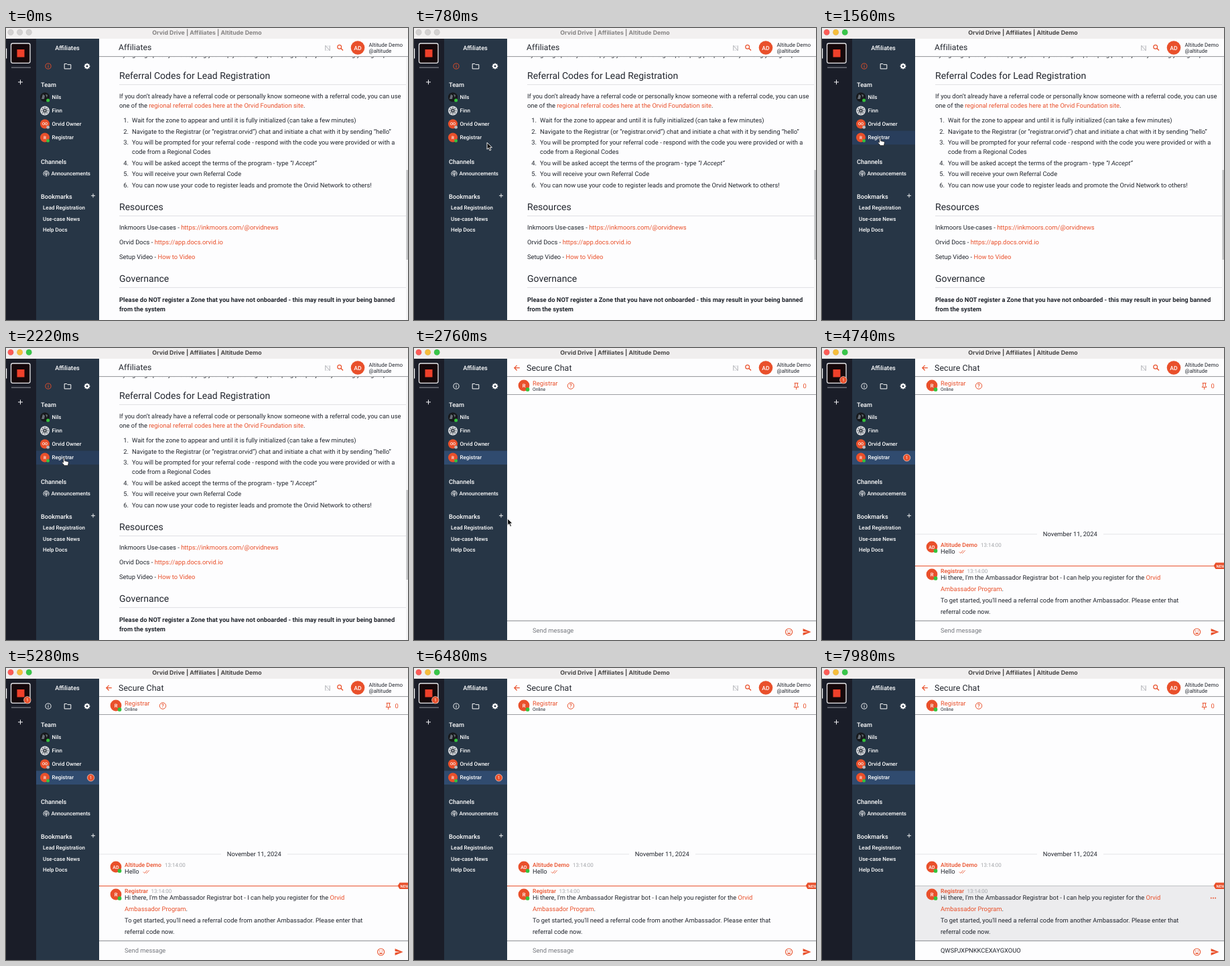
An HTML page for the animation above (8 s loop, 600 by 436 pixels).

```html
<!DOCTYPE html>
<html lang="en">
<head>
<meta charset="utf-8">
<title>Secure chat</title>
<style>
html, body { margin: 0; width: 100%; height: 100%; overflow: hidden; background: #fdfdfe; }
svg { display: block; width: 100%; height: 100%; font-family: Roboto, sans-serif; text-rendering: geometricPrecision; }
text { white-space: pre; }
</style>
</head>
<body>
<svg id="stage" viewBox="0 0 600 436" xmlns="http://www.w3.org/2000/svg"></svg>
<script>
const ORANGE = '#e9502b', INK = '#22262e', WHITE = '#ffffff', GREEN = '#35c23c';
const LOOP = 8000;
// Times of the hard changes, in ms
const T = { focus: 1500, open: 2400, type: 3540, send: 4200, reply: 4740, hover: 6600, paste: 7260 };

const text = (x, y, s, size = 9.38, fill = INK, extra = '') =>
  `<text x="${x}" y="${y}" font-size="${size}" fill="${fill}" ${extra}>${s}</text>`;
const rect = (x, y, w, h, fill, extra = '') =>
  `<rect x="${x}" y="${y}" width="${w}" height="${h}" fill="${fill}" ${extra}/>`;
const disc = (x, y, r, fill, extra = '') =>
  `<circle cx="${x}" cy="${y}" r="${r}" fill="${fill}" ${extra}/>`;
const ring = (x, y, r, color, w = 1) => disc(x, y, r, 'none', `stroke="${color}" stroke-width="${w}"`);
const line = (d, color, w = 1, extra = '') =>
  `<path d="${d}" fill="none" stroke="${color}" stroke-width="${w}" ${extra}/>`;
const shape = (d, fill, extra = '') => `<path d="${d}" fill="${fill}" ${extra}/>`;
const group = (id, body, extra = '') => `<g id="${id}" ${extra}>${body}</g>`;
const link = s => `<tspan fill="${ORANGE}">${s}</tspan>`;
const MID = 'text-anchor="middle"', MEDIUM = 'font-weight="500"', BOLD = 'font-weight="700"';

function avatar(x, y, r, label, dot) {
  const size = r * (label.length > 1 ? 0.84 : 0.9);
  return disc(x, y, r, ORANGE) + text(x, y + size * 0.36, label, size, WHITE, `${MID} ${MEDIUM}`) +
    (dot ? disc(x + r * 0.66, y + r * 0.7, r * 0.34, dot) : '');
}

function infoIcon(x, y, color) {
  return ring(x, y, 4.1, color, 0.9) + line(`M${x} ${y - 0.6}v2.8M${x} ${y - 2.3}v1`, color, 1);
}

function titleBar() {
  const lights = ['#fc5b57', '#f6bd3b', '#38c64a'];
  const dots = fills => fills.map((c, i) => disc(7 + i * 13.6, 6.4, 4.3, c, 'stroke="#0002" stroke-width=".5"')).join('');
  const title = color => text(300, 9.8, 'Orvid Drive | Affiliates | Altitude Demo', 8.8, color,
    `${MID} font-weight="700" style="font-family:Inter,sans-serif"`);
  return group('idle', rect(0, 0, 600, 16, '#f2f0f0') + dots(Array(3).fill('#d3d1d1')) + title('#858383')) +
    group('active', rect(0, 0, 600, 16, '#f0eeee') + dots(lights) + title('#474545'));
}

function rail() {
  return rect(0, 15, 45, 421, '#1a1d28') + rect(0, 30.5, 1.2, 15, WHITE) +
    rect(7.5, 23, 28.5, 29.3, '#16080b', 'rx="2.5" stroke="#e8e8ea" stroke-width="1.3"') +
    rect(16.5, 32, 11, 11.5, '#f0402a') +
    line('M8 59H37', '#a9abb2', 0.9) + line('M18 80.8h7M21.5 77.3v7', '#f2f2f4', 1);
}

function sidebar() {
  const item = (x, y, s) => text(x, y + 2.9, s, 8, WHITE, MEDIUM);
  const head = (y, s) => text(52, y + 3.3, s, 9.2, WHITE, MEDIUM);
  let teeth = '';
  for (let i = 0; i < 8; i++) teeth += rect(120, 52.7, 2, 2.2, WHITE, `transform="rotate(${i * 45} 121 57)"`);
  let spokes = '';
  for (let i = 0; i < 8; i++) spokes += disc(58, 118.9, 0.9, '#5c6069', `transform="rotate(${i * 45} 58 123.5)"`);
  return rect(45, 15, 94, 421, '#273646') +
    group('row', rect(45, 153.5, 94, 20.5, 'currentColor')) +
    text(91.5, 33, 'Affiliates', 9.2, WHITE, `${MID} ${MEDIUM}`) +
    group('infoOn', infoIcon(63, 57, ORANGE)) + group('infoOff', infoIcon(63, 57, WHITE)) +
    line('M87.2 53.5h3.6l1.2 1.2h4.8v6.2h-9.6z', WHITE, 1) +
    teeth + ring(121, 57, 2.4, WHITE, 1.8) +
    head(84.5, 'Team') + head(200, 'Channels') + head(252, 'Bookmarks') +
    disc(58, 103.3, 7, '#17191c') + shape('M53 106l2-7 3 2-1 5zM59 99l3 1-1 4z', '#697078') + disc(62.6, 108.1, 2.5, GREEN) +
    disc(58, 123.5, 7, '#d5d8dc') + spokes + disc(58, 123.5, 2.9, '#3d434c') + disc(58, 123.5, 1.1, '#d5d8dc') +
    avatar(58, 143.3, 7, 'OO', '#b6b9bd') + avatar(58, 163.5, 7, 'R', GREEN) +
    item(68.5, 103, 'Nils') + item(68.5, 123.3, 'Finn') + item(68.5, 143.3, 'Orvid Owner') + item(68.5, 163.3, 'Registrar') +
    line('M57.5 220.7a4.1 4.1 0 1 1 5 0M58.7 218.9a2.2 2.2 0 1 1 2.6 0', WHITE, 0.9) +
    disc(60, 217.4, 0.9, WHITE) + line('M60 218v3.8', WHITE, 1.2) +
    item(67.5, 217.5, 'Announcements') + line('M127 250.3h6M130 247.3v6', WHITE, 0.9) +
    item(55, 268.5, 'Lead Registration') + item(55, 284.7, 'Use-case News') + item(55, 300.7, 'Help Docs');
}

function header() {
  return line('M476.8 26.2v7.6M483.2 33.6v-7.4M476.6 26l6.8 8', '#a6a8ac', 0.9) +
    line('M478.6 27h3.2M478.2 33.2h3', '#c9cbce', 0.7) +
    ring(497.7, 28.2, 2.9, ORANGE, 1.2) + line('M499.8 30.3l3.2 3.2', ORANGE, 1.4) +
    avatar(525, 29.5, 10.3, 'AD') +
    text(541.5, 27.5, 'Altitude Demo', 8) + text(541.5, 36.7, '@altitude', 8) +
    line('M139 42.6H600', '#77797e', 0.8);
}

function page() {
  const heading = (y, s) => text(169, y, s, 14.03) + line(`M169 ${y + 8.6}H597`, '#d8d9dc', 0.8);
  const steps = [
    [141.1, 'Wait for the zone to appear and until it is fully initialized (can take a few minutes)'],
    [157.9, 'Navigate to the Registrar (or “registrar.orvid”) chat and initiate a chat with it by sending “hello”'],
    [173.6, 'You will be prompted for your referral code - respond with the code you were provided or with a'],
    [205.2, 'You will be asked accept the terms of the program - type <tspan font-style="italic">“I Accept”</tspan>'],
    [221.1, 'You will receive your own Referral Code'],
    [237.7, 'You can now use your code to register leads and promote the Orvid Network to others!']
  ];
  return '<clipPath id="below"><rect x="139" y="43" width="461" height="6"/></clipPath>' +
    '<g clip-path="url(#below)">' +
    text(169, 43, 'by signing up early and copying your reply to the group, helping people join by inviting your group') + '</g>' +
    text(168, 33.4, 'Affiliates', 12.2, INK, 'letter-spacing=".08"') +
    heading(76, 'Referral Codes for Lead Registration') +
    text(169, 105.1, 'If you don’t already have a referral code or personally know someone with a referral code, you can use') +
    text(169, 119.4, `one of the ${link('regional referral codes here at the Orvid Foundation site')}.`) +
    steps.map(([y, s], i) => text(183, y, `${i + 1}.`, 9.38, INK, 'text-anchor="end"') + text(188, y, s)).join('') +
    text(188, 188.2, 'code from a Regional Codes') +
    heading(272, 'Resources') +
    text(169, 301.2, `Inkmoors Use-cases - ${link('https://inkmoors.com/@orvidnews')}`) +
    text(169, 323.2, `Orvid Docs - ${link('https://app.docs.orvid.io')}`) +
    text(169, 345.2, `Setup Video - ${link('How to Video')}`) +
    heading(379, 'Governance') +
    text(169, 409.1, 'Please do NOT register a Zone that you have not onboarded - this may result in your being banned', 9.38, INK, BOLD) +
    text(169, 423.1, 'from the system', 9.38, INK, BOLD) +
    rect(597, 44, 3, 392, '#f4f4f5') + rect(597.4, 212, 2.6, 134, '#c2c3c5');
}

function chatHead() {
  return line('M157.8 29.7h-7.6M153.6 25.9l-3.8 3.8 3.8 3.8', ORANGE, 1.2) +
    text(168, 33.5, 'Secure Chat', 12.4, INK, 'letter-spacing=".08"') +
    avatar(164, 56, 8.4, 'R', GREEN) +
    text(177, 55.7, 'Registrar', 9.4, ORANGE) + text(177, 64, 'Online', 6.8) +
    ring(234, 56.5, 4.7, ORANGE, 1) + text(234, 59.3, '?', 7.8, ORANGE, `${MID} ${MEDIUM}`) +
    line('M567.6 52.4h6M568.8 52.4v4.2l-1.6 1.8h6.8l-1.6-1.8v-4.2M570.6 58.4v3.6', ORANGE, 1) +
    text(580.4, 59.9, '0', 9.4, ORANGE) +
    line('M139 69.5H600', '#85878b', 0.8);
}

function chatLog() {
  const sent = line('M139 278H321M420 278H600', '#dcdde0', 0.8) +
    text(370.3, 281.3, 'November 11, 2024', 9.4, INK, MID) +
    avatar(164, 297, 8.4, 'AD', GREEN) +
    text(177, 296.6, 'Altitude Demo', 8.65, ORANGE, MEDIUM) + text(237, 296.8, '13:14:00', 8, '#a4a6aa') +
    text(177, 307.3, 'Hello') +
    line('M204.8 304.4l2 2 4-4.4M208.8 305.6l.9.9 4-4.4', ORANGE, 0.8);
  const reply = group('hover', rect(139, 325, 461, 82, '#ececee') + line('M139 325.3H600', '#a9abae', 0.7)) +
    group('rule', line('M139 325.5H600', ORANGE, 1.1)) +
    shape('M584.5 325.3l3-4.8H600v9.6h-12.5z', ORANGE) + text(588.6, 327.6, 'NEW', 5.8, WHITE, MEDIUM) +
    avatar(164, 338, 8.4, 'R', GREEN) +
    text(177, 335.6, 'Registrar', 8.65, ORANGE, MEDIUM) + text(216.5, 335.8, '13:14:00', 8, '#a4a6aa') +
    text(177, 345.9, `Hi there, I'm the Ambassador Registrar bot - I can help you register for the ${link('Orvid')}`) +
    text(177, 362.6, `${link('Ambassador Program')}.`) +
    text(177, 379.7, "To get started, you'll need a referral code from another Ambassador. Please enter that") +
    text(177, 396.7, 'referral code now.') +
    group('more', [580.8, 584, 587.2].map(x => disc(x, 343.5, 0.95, ORANGE)).join(''));
  return group('sent', sent) + group('reply', reply);
}

function composer() {
  return rect(139, 407, 461, 29, '#fdfdfe') + line('M139 407.4H600', '#6d6f74', 0.8) +
    text(177, 424.5, '', 9.35, INK, 'id="field"') +
    rect(0, 416, 1, 10.5, INK, 'id="caret"') +
    ring(559.6, 424, 5, ORANGE, 1.1) + disc(557.8, 422.6, 0.8, ORANGE) + disc(561.4, 422.6, 0.8, ORANGE) +
    shape('M556.8 425.2h5.6a2.9 2.6 0 0 1-5.6 0z', ORANGE) +
    shape('M580.6 419l12 5-12 5v-3.9l8-1.1-8-1.1z', ORANGE);
}

function badges() {
  const badge = (x, y) => disc(x, y, 5.2, ORANGE, 'stroke="#f6d9d1" stroke-width=".7"') + text(x, y + 2.4, '1', 6.6, WHITE, MID);
  return group('badges', badge(31.8, 47.8) + badge(126.6, 163.8));
}

function pointers() {
  const edge = 'stroke="#fff" stroke-width=".9" stroke-linejoin="round"';
  return group('arrow', shape('M0 0v10.2l2.3-2.2 1.7 3.9 1.9-.8-1.7-3.8h3.3z', '#111', edge)) +
    group('hand', shape('M-1 .6q1-1.3 2 0v4l4.6 1q1.2.4 1 1.8l-.9 4.1h-5.2l-3.6-4.3q.3-1.3 2.1-.2z', WHITE, 'stroke="#222" stroke-width=".8" stroke-linejoin="round"')) +
    group('beam', line('M-2-5q2 0 2 1.6v6.8q0 1.6-2 1.6M2-5q-2 0-2 1.6v6.8q0 1.6 2 1.6', '#222', 0.8));
}

const svg = document.getElementById('stage');
svg.innerHTML = rect(0, 0, 600, 436, '#fdfdfe') + group('page', page()) +
  group('chat', chatLog() + chatHead() + composer()) +
  header() + rail() + sidebar() + titleBar() + badges() + pointers();

const el = {};
svg.querySelectorAll('[id]').forEach(node => el[node.id] = node);
const show = (id, on) => el[id].setAttribute('display', on ? 'inline' : 'none');

// Pointer stops: time, x, y
const path = [
  [180, 330, 236], [720, 109, 171], [1080, 109, 171], [1440, 86.7, 164],
  [2520, 86.7, 164], [3120, 236, 420], [6480, 236, 420], [6780, 242, 388], [LOOP, 242, 388]
];
const ease = p => p * p * (3 - 2 * p);

function pointerAt(t) {
  let i = 0;
  while (i < path.length - 2 && t >= path[i + 1][0]) i++;
  const [t0, x0, y0] = path[i], [t1, x1, y1] = path[i + 1];
  const p = ease(Math.min(1, Math.max(0, (t - t0) / (t1 - t0))));
  return [x0 + (x1 - x0) * p, y0 + (y1 - y0) * p];
}

function fieldAt(t) {
  if (t >= T.paste) return 'QWSPJXPNKKCEXAYGXOUO';
  if (t < T.type || t >= T.send) return '';
  return 'Hello'.slice(0, 1 + Math.floor((t - T.type) / 115));
}

let shown = null;
function render(t) {
  const inChat = t >= T.open, focused = t >= T.focus, hovered = t >= T.hover;
  show('idle', !focused);
  show('active', focused);
  show('row', focused);
  el.row.setAttribute('color', inChat ? '#304b6f' : '#293e5c');
  show('page', !inChat);
  show('chat', inChat);
  show('infoOn', !inChat);
  show('infoOff', inChat);
  show('sent', t >= T.send);
  show('reply', t >= T.reply);
  el.sent.setAttribute('transform', `translate(0 ${t < T.reply ? 82 : 0})`);
  show('hover', hovered);
  show('more', hovered);
  show('rule', !hovered);
  show('badges', t >= T.reply && t < T.paste);

  const value = fieldAt(t);
  if (value !== shown) {
    shown = value;
    el.field.textContent = value || 'Send message';
    el.field.setAttribute('fill', value ? INK : '#74777d');
  }
  const typing = value !== '' && t < T.send;
  show('caret', typing);
  if (typing) el.caret.setAttribute('x', 177.3 + el.field.getComputedTextLength());

  const [x, y] = pointerAt(t);
  const visible = t >= 180 && t < T.type || t >= 6540 && t < T.paste;
  const kind = y > 407 ? 'beam' : focused && t < 2600 ? 'hand' : 'arrow';
  for (const id of ['arrow', 'hand', 'beam']) {
    show(id, visible && id === kind);
    el[id].setAttribute('transform', `translate(${x} ${y})`);
  }
}

const start = performance.now();
function tick() {
  render((performance.now() - start) % LOOP);
  requestAnimationFrame(tick);
}
tick();
</script>
</body>
</html>
```
